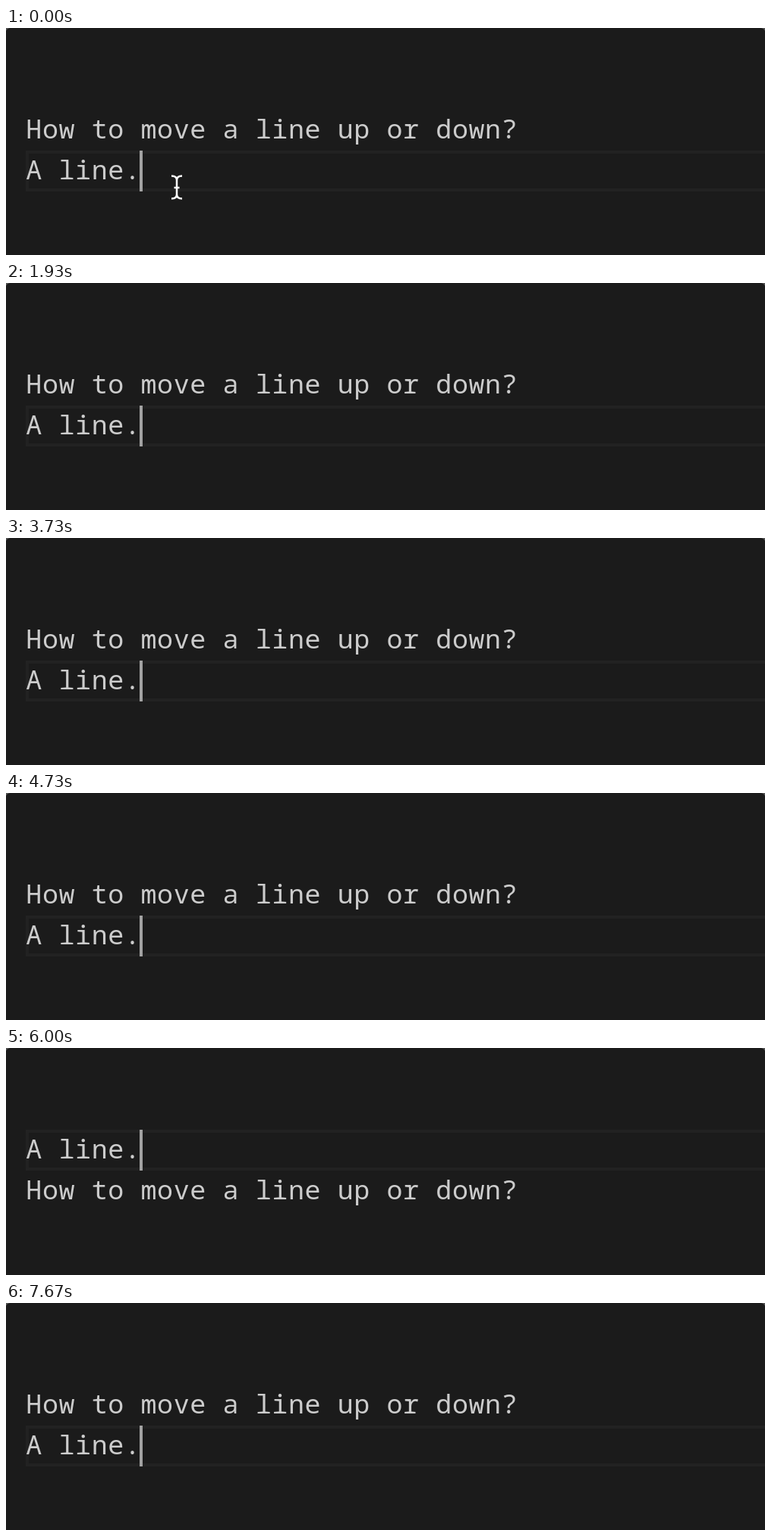
Write an HTML page that moves like this. It is 1000 px wide and 300 px high and loops after 7.79 s.

```html
<!DOCTYPE html>
<html lang="en">
<head>
<meta charset="utf-8">
<title>Move a line up or down</title>
<style>
  html, body { margin: 0; width: 100%; height: 100%; overflow: hidden; background: #1b1b1b; }
  svg { display: block; }
  text { font: 35px "Noto Sans Mono", monospace; letter-spacing: .6px; fill: #ccc; white-space: pre; }
</style>
</head>
<body>
<svg width="1000" height="300" viewBox="0 0 1000 300">
  <rect width="1000" height="300" fill="#1b1b1b"/>
  <path d="M0 0H5Q1 1 0 4ZM1000 0H995Q999 1 1000 4Z" fill="#555"/>
  <g id="active">
    <rect x="28" y="110" width="990" height="50" fill="none" stroke="#222" stroke-width="4"/>
    <text x="26.3" y="146">A line.</text>
    <rect id="caret" x="176" y="108" width="4" height="54" fill="#a2a2a2"/>
  </g>
  <text id="question" x="26.3" y="146">How to move a line up or down?</text>
  <path id="pointer" d="M218 195.5Q225 195.5 225 201Q225 195.5 232 195.5M225 200V221M218 225.5Q225 225.5 225 220Q225 225.5 232 225.5M221.5 211H228.5"
        fill="none" stroke="#fff" stroke-width="2.5"/>
</svg>
<script>
  const LOOP = 7790, ROW = 54, POINTER_END = 1930;
  const swaps = [2000, 3670, 5000, 6470];
  const blinks = [[130, 600], [1130, 1600], [2470, 3000], [3470, 3670],
                  [4200, 4670], [5530, 6000], [6930, 7470]];
  const $ = id => document.getElementById(id);
  const show = (id, on) => $(id).setAttribute("visibility", on ? "visible" : "hidden");
  const setRow = (id, row) => $(id).setAttribute("transform", `translate(0 ${row * ROW})`);

  function draw() {
    const t = performance.now() % LOOP;
    const up = swaps.filter(s => t >= s).length % 2;
    setRow("active", 1 - up);
    setRow("question", up);
    show("caret", !blinks.some(([off, on]) => t >= off && t < on));
    show("pointer", t < POINTER_END);
    requestAnimationFrame(draw);
  }
  draw();
</script>
</body>
</html>
```
